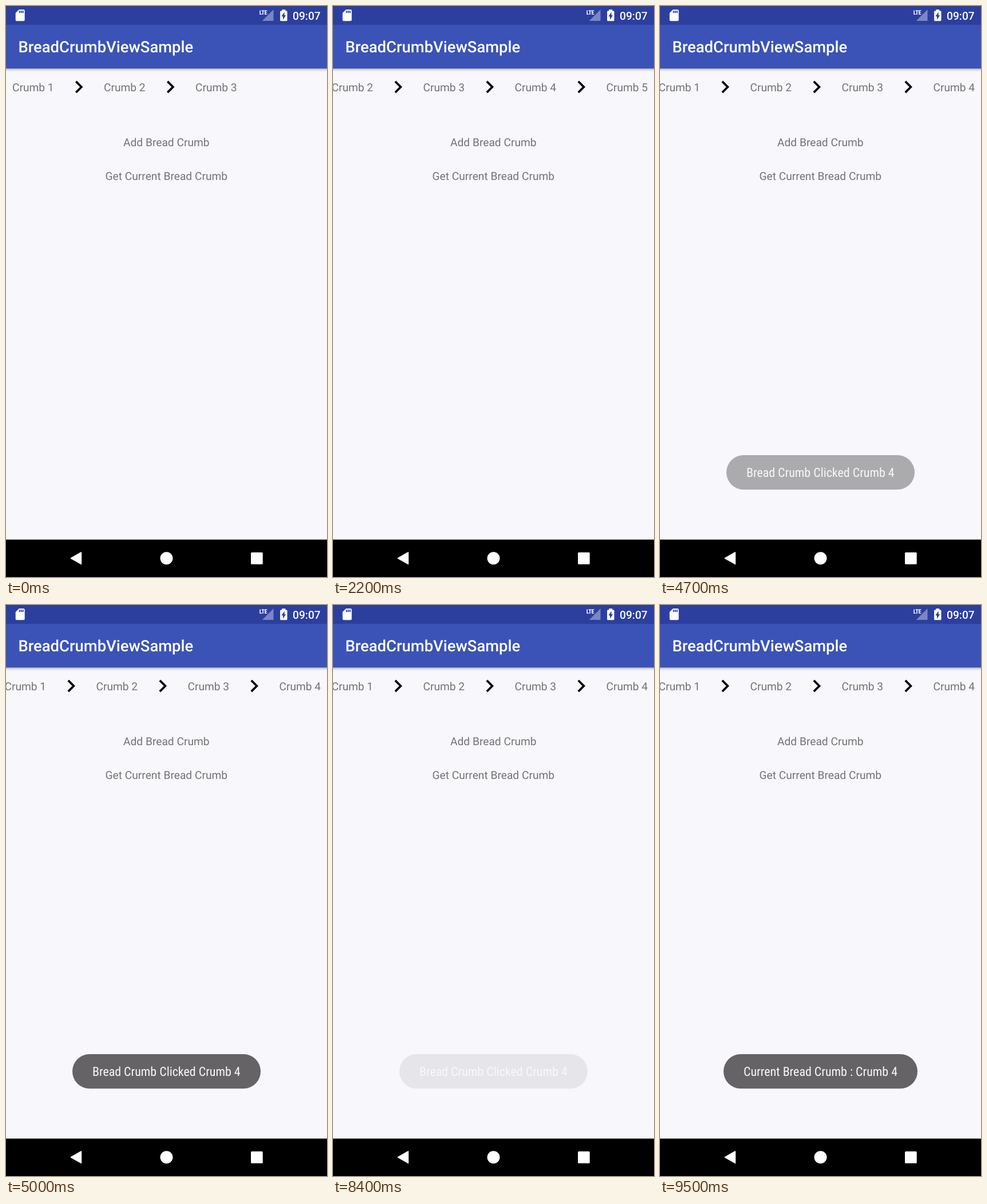
Write an HTML page that moves like this. It is 561 by 998 pixels and loops after 9600 ms.

```html
<!DOCTYPE html>
<html lang="en">
<head>
<meta charset="utf-8">
<title>BreadCrumbViewSample</title>
<style>
  html, body { margin: 0; width: 100%; height: 100%; overflow: hidden; background: #f8f7fb; }
  svg { display: block; width: 100%; height: 100%; }
  text { font-family: Roboto, "Noto Sans", sans-serif; font-size: 19.2px; fill: #737275; text-rendering: geometricPrecision; }
  .mid { text-anchor: middle; }
  .title { font-size: 27.4px; font-weight: 500; fill: #fff; }
  .clock { font-weight: 500; fill: #fff; }
  .lte, .toast text { font-family: "Roboto Condensed", Roboto, sans-serif; font-stretch: 75%; }
  .lte { font-size: 10.5px; font-weight: 700; letter-spacing: -.5px; fill: #fff; }
  .toast text { font-size: 21.95px; fill: #f9f8fa; }
  .toast.wide text { font-size: 19.4px; }
  .toast rect { fill: #656366; }

  .strip, .late, .toast { animation: 9600ms step-end infinite; }
  .strip { animation-name: scroll; }
  .late { animation-name: appear; }
  .clicked { animation-name: clicked; }
  .current { animation-name: current; }

  @keyframes scroll {
    0% { transform: translateX(0); }
    12.5% { transform: translateX(-13.5px); }
    22.916% { transform: translateX(-173.5px); }
    47.916%, 100% { transform: translateX(-13.5px); }
  }
  @keyframes appear {
    0% { visibility: hidden; }
    9.375%, 100% { visibility: visible; }
  }
  /* toast fades: quadratic ease over 500 ms, in 100 ms steps */
  @keyframes clicked {
    0% { opacity: 0; }
    47.916% { opacity: .2; }
    48.958% { opacity: .518; }
    50% { opacity: .756; }
    51.041% { opacity: .914; }
    52.083% { opacity: 1; }
    84.375% { opacity: .884; }
    85.416% { opacity: .708; }
    86.458% { opacity: .452; }
    87.5% { opacity: .116; }
    88.541%, 100% { opacity: 0; }
  }
  @keyframes current {
    0% { opacity: 0; }
    94.79% { opacity: .2; }
    95.833% { opacity: .518; }
    96.875% { opacity: .756; }
    97.916% { opacity: .914; }
    98.958%, 100% { opacity: 1; }
  }
</style>
</head>
<body>
<svg viewBox="0 0 561 998" preserveAspectRatio="none">
  <defs>
    <linearGradient id="shade" x1="0" y1="0" x2="0" y2="1">
      <stop offset="0" stop-color="#000" stop-opacity=".3"/>
      <stop offset=".4" stop-color="#000" stop-opacity=".12"/>
      <stop offset="1" stop-color="#000" stop-opacity="0"/>
    </linearGradient>
    <path id="chevron" d="M123.6 130.6l-2.6 2.6 8.3 8.3-8.3 8.3 2.6 2.6 10.9-10.9z"/>
  </defs>

  <rect width="561" height="998" fill="#f8f7fb"/>

  <g class="strip">
    <text x="10.9" y="149">Crumb 1</text>
    <use href="#chevron"/>
    <text x="170.9" y="149">Crumb 2</text>
    <use href="#chevron" x="160"/>
    <text x="330.9" y="149">Crumb 3</text>
    <g class="late">
      <use href="#chevron" x="320"/>
      <text x="490.9" y="149">Crumb 4</text>
      <use href="#chevron" x="480"/>
      <text x="650.9" y="149">Crumb 5</text>
    </g>
  </g>

  <text class="mid" x="280.3" y="245">Add Bread Crumb</text>
  <text class="mid" x="280.3" y="304">Get Current Bread Crumb</text>

  <!-- app bar and status bar -->
  <rect y="109" width="561" height="6" fill="url(#shade)"/>
  <rect y="32" width="561" height="77.2" fill="#3b53b7"/>
  <rect width="561" height="33" fill="#2c3f9f"/>
  <text class="title" x="21.4" y="81">BreadCrumbViewSample</text>
  <path transform="translate(12.7 4.2)" fill="#fff" d="M18 2h-8L4 8v12c0 1.1.9 2 2 2h12c1.1 0 2-.9 2-2V4c0-1.1-.9-2-2-2zm-6 6h-2V4h2zm3 0h-2V4h2zm3 0h-2V4h2z"/>
  <path d="M467.5 6.3V26h-19.7z" fill="#7b87c4"/>
  <text class="lte" x="442.8" y="15.4">LTE</text>
  <path d="M482.3 6.2h6v2.2h1.7q1.5 0 1.5 1.5v14.8q0 1.5-1.5 1.5h-9.4q-1.5 0-1.5-1.5V9.900q0-1.5 1.5-1.5h1.7z" fill="#fff"/>
  <path d="M486.6 10.600v5.700h2.600l-5.200 7.700v-5.800h-2.600z" fill="#2c3f9f"/>
  <text class="clock" x="501" y="24">09:07</text>

  <!-- navigation bar -->
  <rect y="932.6" width="561" height="66" fill="#000"/>
  <path d="M113.500 965.200L131.400 955v20.400z" fill="#fff" stroke="#fff" stroke-width="1.600" stroke-linejoin="round"/>
  <circle cx="280.500" cy="965.200" r="11" fill="#fff"/>
  <rect x="428" y="955" width="20.700" height="20.700" rx="1.500" fill="#fff"/>

  <g class="toast clicked">
    <rect x="116" y="785" width="329" height="60.300" rx="30.100"/>
    <text class="mid" x="280.300" y="823.300">Bread Crumb Clicked Crumb 4</text>
  </g>
  <g class="toast current">
    <rect x="111" y="785" width="339" height="60.300" rx="30.100"/>
    <text class="mid" x="280.500" y="823.300">Current Bread Crumb : Crumb 4</text>
  </g>
</svg>
<script>
  // Without a condensed face, use a smaller size of the regular one.
  for (const toast of document.querySelectorAll('.toast')) {
    if (toast.querySelector('text').getComputedTextLength() > 282) toast.classList.add('wide');
  }
</script>
</body>
</html>
```
